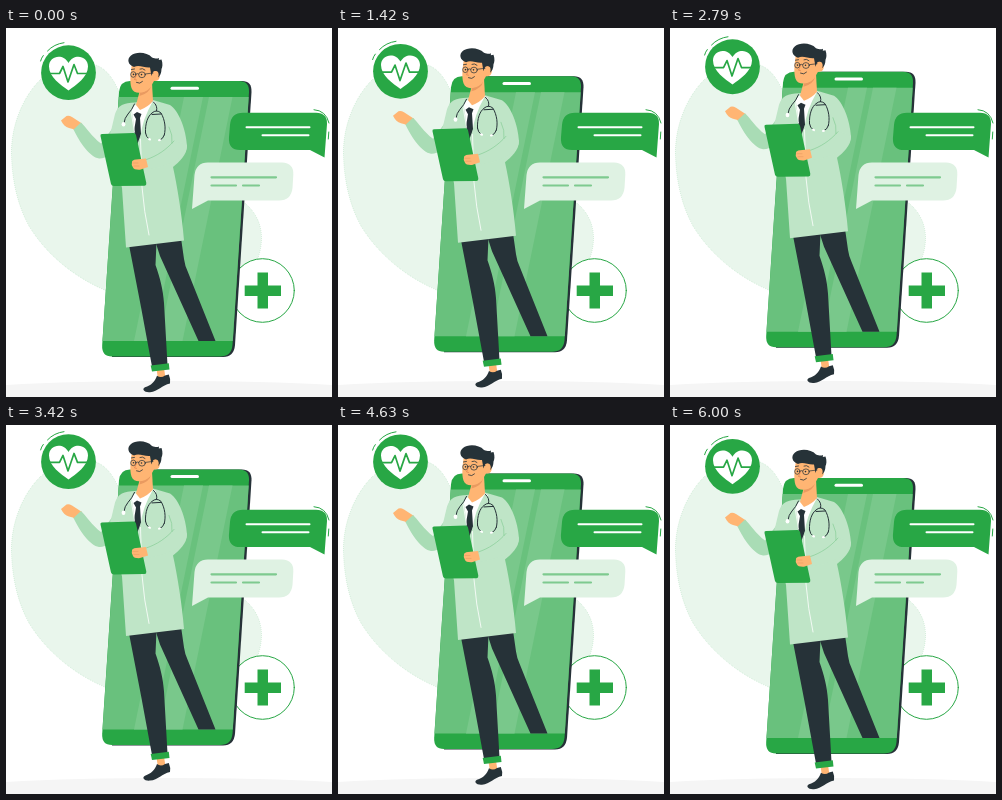
Write an HTML page that moves like this. It is 326 px wide and 369 px high and loops after 6.04 s.

```html
<!DOCTYPE html>
<html lang="en">
<head>
<meta charset="utf-8">
<title>Online doctor</title>
<style>
html, body { margin: 0; width: 100%; height: 100%; overflow: hidden; background: #fff; }
svg { display: block; width: 326px; height: 369px; }
.green { fill: #28a745; }
.dark { fill: #263238; }
.skin { fill: #ffb573; }
.coat { fill: #bfe5c7; }
.sleeve { fill: #a9dcb5; }
.line { fill: none; stroke: #28a745; stroke-width: 1; stroke-linecap: round; stroke-linejoin: round; }
.ink { stroke: #263238; }
.white { stroke: #fff; }
.mid { stroke: #7eca8f; }
</style>
</head>
<body>
<svg viewBox="0 0 326 369">
  <!-- background -->
  <path fill="#e9f6ec" stroke="#8fd0a0" stroke-width=".5" stroke-dasharray=".6 1.400" d="M5.500 126C5 99 16 70 34 52C49 38 72 30 91 37.500C114 47 117 84 132 108C153 137 197 153 228 168C246 177 256 193 255.500 211C255 233 243 252 222 263C196 277 151 279 121 270C82 259 45 234 23 198C11 176 6 151 5.500 126Z"/>
  <ellipse cx="163" cy="367" rx="230" ry="14" fill="#f5f5f5"/>
  <circle class="line" cx="256.500" cy="262.500" r="31.800" style="fill:#fff"/>
  <path class="green" d="M251.500 244.500H262V257.500H275V268H262V280.500H251.500V268H238.700V257.500H251.500Z"/>

  <g id="doctor">
    <!-- phone -->
    <path class="dark" d="M126 53H236Q246 53 245.500 64L229 317Q228 329 217 329H106Z"/>
    <path class="green" d="M124 53H233Q243.500 53 243 64L226.500 317Q225.500 328.500 214 328.500H106Q95.500 328.500 96.200 317L113 64Q114 53 124 53Z"/>
    <path fill="#69c17d" d="M112.700 69H242.700L226.800 313H96.500Z"/>
    <path fill="#79c88b" d="M178 69H197L147 313H128ZM203 69H226.500L176.500 313H153Z"/>
    <path class="line white" style="stroke-width:3" d="M166 60.200H191.500"/>

    <!-- legs -->
    <path class="dark" d="M149.500 214L175 210L178 231Q179 238 181.500 243L209.500 313H192.500L154 228Z"/>
    <path class="dark" d="M123 217L150.500 214L149.500 237C154 250 157 261 158 275L161.500 337L146 338.500L135 279Z"/>
    <path class="skin" d="M150.500 341L158 340L159.500 350L152 351Z"/>
    <path class="green" d="M144.700 337.500L162.800 335.300L163.500 341.500L146 343.500Z"/>
    <path class="dark" d="M151 347.700Q155 350.500 159 347.500L162.800 346.500Q164.800 351 164 355.500C156 357 152 363.500 144 364.200C138 364.700 135.500 361 139 359.300C145 357.500 149 353.500 151 347.700Z"/>

    <!-- raised arm -->
    <path class="skin" d="M55 92.500L60.500 88Q63 87.200 66 89L76 95.500L70 103Q67 100.500 63 100C59.500 99 57 96.500 55 92.500Z"/>
    <path class="sleeve" d="M67.500 101.500L75 94.500C80 99 86 109 95 115.500L109 97L113 118C106 125 100 131 93 130.500C84 129 74 115 67.500 101.500Z"/>

    <!-- coat -->
    <path class="coat" d="M129 74.500C118 75 112 77 109 86L104 107L116 160L120 219.500L178 212.500C176 187 171 157 167 139C173 134 181 127 181 118C180 101 173 83 164 77L147 72Z"/>
    <path fill="#fff" d="M129 77L146 72L150 75L138 106L129 104L125.500 80Z"/>
    <path class="skin" d="M134 62L130 77L134 82Q142 79 147 73L146 55Z"/>
    <path fill="#e99a60" d="M134 64Q141 64 145 58Q144 65 133.500 68Z"/>
    <path class="dark" d="M127.500 86.500L131 84L135.500 86L134 90L135 106L131 117L128 103L130 91Z"/>
    <path class="coat" d="M147 73L153 80Q146 96 137 113L134.500 109Q136 92 147 73ZM129 76L125 83L128.500 106L120 105L119 82Z"/>
    <path class="line white" style="stroke-width:.8" d="M134.500 111L136 159Q138 184 143 207M125 83L128.500 104"/>

    <!-- stethoscope -->
    <path class="line ink" d="M128.500 76Q126 82 122 86Q118.500 90 118 95M147.500 74Q152 78 150.500 83M139.500 105C139 95 142 88 146 85Q150.500 81 155 85C159 92 160 100 158.300 107M146 86.500L155 86M139.500 105Q140 109 143 111M158.300 107Q157 111 154 112"/>
    <path class="line white" style="stroke-width:2" d="M143 111L144 111.500M154 112L153 112.300"/>
    <ellipse cx="117.500" cy="96.300" rx="1.900" ry="2.300" fill="#fff"/>

    <!-- clipboard and arm -->
    <path class="green" d="M96 106L127.500 105Q129.500 105 130 107L140.300 155Q140.700 157.500 138.500 157.700L108 158Q105.500 158 105 156L94.500 108Q94 106 96 106Z"/>
    <path class="coat" d="M140 131.500C151 128 160 121 167 112L181 117C181 125 175 130 167 134C159 138 150 140 142.500 141.500Z"/>
    <path class="line mid" style="stroke-width:.6" d="M140.500 131.500C151 128 160 122 168 113M163 99Q167 107 166 115"/>
    <path class="skin" d="M126 134Q126 132 130 131.500L140 130.500L142 139L134 141.700Q128 142 127 139.500Q125 137 126 134Z"/>
    <path class="line" style="stroke:#e99a60;stroke-width:.6" d="M127 135H132M128 138H133"/>

    <!-- head -->
    <path class="skin" d="M126 36C124.500 44 123.500 54 125.500 60C128 66.500 137 66.500 144 60L148 53C153 54 156 48 152 43L151 34Z"/>
    <path class="dark" d="M128 39C122 37 120.500 31 125 27.500C130 23.500 141 24 146 29.500C149 30.500 151 31 153 30L152.800 32L155.500 31.500C157 36 156.500 39 155.500 41C155.500 45 154 48 152 49.500C152 43 149 42 147 44L145.500 48L144 39.500C138 40 133 36.500 128 39Z"/>
    <path class="skin" d="M146.500 46Q149 41.500 152 44Q154 48 150 52L146 53Z"/>
    <g class="line ink" style="stroke-width:.7">
      <ellipse cx="127.300" cy="46.500" rx="2.600" ry="2.800"/>
      <ellipse cx="136" cy="46.800" rx="3.300" ry="2.900"/>
      <path d="M130 46Q131.300 45 132.700 46M139.300 46L147 45"/>
    </g>
    <circle class="dark" cx="127.500" cy="46.400" r=".8"/>
    <circle class="dark" cx="135.500" cy="46.600" r=".8"/>
    <path class="line ink" style="stroke-width:.8" d="M125.500 41.500L128.500 41M134 41Q136.500 39.700 139 42M130.500 54.500Q134 56.500 136.500 53.500"/>
    <path class="line" style="stroke:#e07f4f;stroke-width:.7" d="M130.500 47L128.500 51.500L130.500 52"/>
  </g>

  <!-- heart badge -->
  <g id="badge">
    <circle class="green" cx="62.500" cy="44.700" r="27.400"/>
    <path fill="#fff" d="M62.500 62.500C55 57 43 49 43 38.500C43 28 57 25 62.500 35C68 25 82 28 82 38.500C82 49 70 57 62.500 62.500Z"/>
    <path class="line" style="stroke-width:1.700" d="M43 45.500H53.500L57 38.500L62 54L68 36.500L71.500 45.500H82"/>
    <path class="line" d="M41.500 23Q48 16 58 14.700M34.600 33Q35.300 30 37.300 27.500"/>
  </g>

  <!-- messages -->
  <path class="green" d="M237 84.800H310Q321.500 85 321 96L318.500 129.500L304 122H234Q222 122 223 109L224 97Q225 84.800 237 84.800Z"/>
  <path class="line white" style="stroke-width:2" d="M240.500 99.200H303.500M256.500 107.300H302.500"/>
  <path class="line" d="M308 81.700Q320 82.500 323 95M322.800 104L322.300 111"/>
  <path fill="#dff2e3" d="M202 134.500H276Q288 135 287.300 147L286.500 160Q285 172.500 273 172.500H202L186 181L188.500 147Q190 134.500 202 134.500Z"/>
  <path class="line mid" style="stroke-width:2.200" d="M205.500 149.300H270M205.500 157.500H230M237 157.500H253"/>
</svg>
<script>
const LOOP = 6040, PERIOD = 6000, RISE = 10;
const doctor = document.getElementById("doctor");
const badge = document.getElementById("badge");

// Linear rise and fall; still until the delay has passed.
function float(el, t, delay) {
  const p = Math.max(0, t - delay) % PERIOD / PERIOD;
  const y = -RISE * (1 - Math.abs(1 - 2 * p));
  el.setAttribute("transform", `translate(0 ${y.toFixed(3)})`);
}

function draw() {
  const t = performance.now() % LOOP;
  float(doctor, t, 0);
  float(badge, t, 1000);
  requestAnimationFrame(draw);
}
draw();
</script>
</body>
</html>
```
